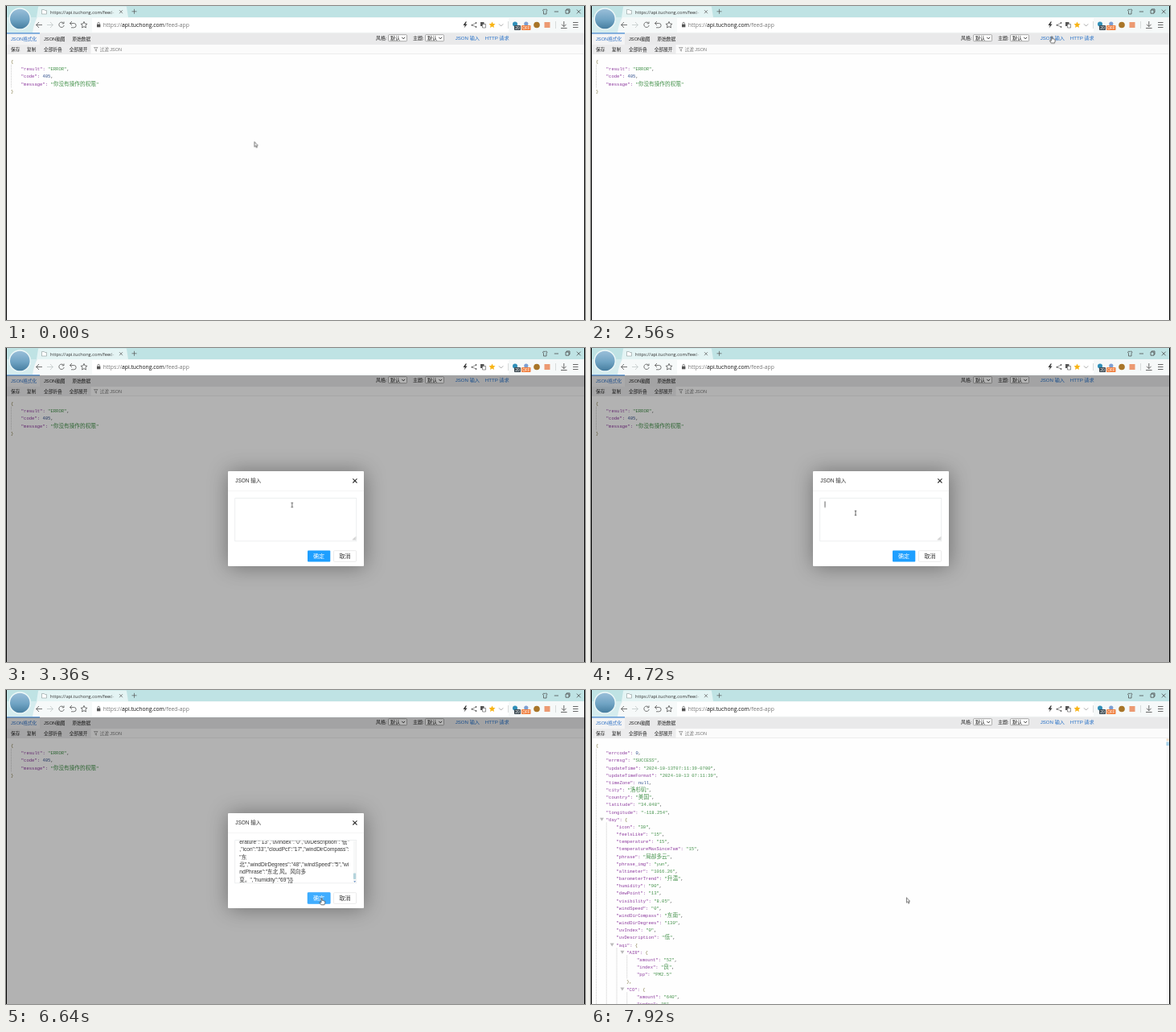
Animation of 720 by 390 pixels, one loop 8000 ms. Source, as an HTML page:

```html
<!DOCTYPE html>
<html lang="zh-CN">
<head>
<meta charset="utf-8">
<title>JSON</title>
<style>
html, body { margin: 0; width: 100%; height: 100%; overflow: hidden; background: #fefefe; }
svg, div { position: absolute; }
svg { left: 0; top: 0; overflow: hidden; }
text { white-space: pre; font-family: "Liberation Sans", "Noto Sans CJK SC", "Noto Sans CJK JP", sans-serif; }
.ui { font-family: "Open Sans", "Noto Sans", sans-serif; }
.code { font: 5.56px "Liberation Mono", "Noto Sans CJK SC", "Noto Sans CJK JP", monospace; }
.cjk { font-size: 6.67px; }
#shade { left: 1px; top: 34px; width: 718px; height: 356px; background: rgba(0, 0, 0, .3); }
#dialog { left: 275.5px; top: 152.5px; width: 169px; height: 118px; background: #fff; border-radius: 1px; box-shadow: 1px 1px 26px rgba(0, 0, 0, .38); }
</style>
</head>
<body>
<svg id="page" width="720" height="390"></svg>
<div id="shade"></div>
<div id="dialog"><svg id="form" width="169" height="118" viewBox="275.5 152.5 169 118"></svg></div>
<svg id="top" width="720" height="390"></svg>
<script>
const LOOP = 8000;
const CLICK_LINK = 2680, CLICK_FIELD = 4600, PASTE = 5440, CONFIRM = 7040;
const $ = id => document.getElementById(id);

function add(parent, tag, attrs = {}, content = '') {
  const el = document.createElementNS('http://www.w3.org/2000/svg', tag);
  for (const key in attrs) el.setAttribute(key, attrs[key]);
  el.textContent = content;
  return parent.appendChild(el);
}
const rect = (p, x, y, width, height, fill, more) => add(p, 'rect', { x, y, width, height, fill, ...more });
const line = (p, d, stroke = '#555', width = .8, fill = 'none') =>
  add(p, 'path', { d, stroke, 'stroke-width': width, fill });
const shape = (p, d, fill) => add(p, 'path', { d, fill });
const text = (p, x, y, size, fill, str, more) => add(p, 'text', { x, y, 'font-size': size, fill, ...more }, str);

// steps: [time, properties]
function animate(el, steps, easing = 'linear') {
  const frames = steps.map(([t, props]) => ({ ...props, offset: t / LOOP, easing }));
  el.animate(frames, { duration: LOOP, iterations: Infinity });
}
// Shown only inside the given [from, to] spans.
function show(el, ...spans) {
  const steps = [[0, { opacity: 0 }]];
  for (const [from, to] of spans) steps.push([from, { opacity: 1 }], [to, { opacity: 0 }]);
  steps.push([LOOP, { opacity: 0 }]);
  animate(el, steps, 'step-end');
}

function drawBrowser(p) {
  rect(p, 0, 0, 720, 14, '#bfe3e4');
  rect(p, 0, 14, 720, 20, '#f6f9f9');
  rect(p, 107, 15, 518, 17.5, '#fff');
  shape(p, 'M38 14L40 1.5Q40 .5 41 .5H149Q150 .5 150 1.5L152 14Z', '#e4f4f4');
  shape(p, 'M0 14H39Q35 20 33 33H0Z', '#d5ecee');

  const sky = add(add(p, 'defs'), 'linearGradient', { id: 'sky', x2: 0, y2: 1 });
  add(sky, 'stop', { offset: 0, 'stop-color': '#9cc0da' });
  add(sky, 'stop', { offset: .55, 'stop-color': '#6fa3c3' });
  add(sky, 'stop', { offset: 1, 'stop-color': '#447b9d' });
  add(p, 'circle', { cx: 17.3, cy: 16, r: 13, fill: 'url(#sky)', stroke: '#eef8f8', 'stroke-width': 1.4 });

  line(p, 'M44.5 4.5H47.5L48.3 5.5H50.5V10H44.5Z', '#8a9898', .6, '#fff');
  text(p, 55, 9.6, 5.7, '#333', 'https://api.tuchong.com/feed-', { class: 'ui' });
  rect(p, 130, 3, 6, 9, '#e4f4f4', { opacity: .5 });
  line(p, 'M141 5.2L145 9.2M145 5.2L141 9.2', '#555', .7);
  line(p, 'M156.5 6.8H162.5M159.5 3.8V9.8', '#555', .7);

  line(p, 'M667.5 5L669 4Q670.3 5.4 671.6 4L673 5L672 6.8V10H668.5V6.8Z', '#444', .7);
  line(p, 'M681.8 7H687M696 5H700V9.2H696ZM697.2 5V3.9H701V8H700M709.8 4.6L714.6 9.4M714.6 4.6L709.8 9.4', '#444', .75);

  line(p, 'M45 23.5H37.7M41 20L37.6 23.5L41 27');
  line(p, 'M51 23.5H58.3M55 20L58.4 23.5L55 27', '#c2c8c8');
  line(p, 'M71.5 21.2A3.2 3.2 0 1 0 72.2 24M72 19.5V21.8H69.7');
  line(p, 'M79.5 21.5H84.5A2.6 2.6 0 0 1 84.5 26.8H81M82 19L79.4 21.5L82 24');
  const star = x => `M${x} 19.4l1.2 2.6 2.8.3-2.1 1.9.6 2.8-2.5-1.4-2.5 1.4.6-2.8-2.1-1.9 2.8-.3Z`;
  line(p, star(97));
  rect(p, 113, 22.7, 4.4, 3.6, '#555');
  line(p, 'M114 22.8V21.5A1.2 1.2 0 0 1 116.4 21.5V22.8', '#555', .7);

  const url = add(p, 'text', { x: 120.8, y: 25.8, 'font-size': 6.8, class: 'ui' });
  add(url, 'tspan', { fill: '#777' }, 'https://');
  add(url, 'tspan', { fill: '#111' }, 'api.tuchong.com');
  add(url, 'tspan', { fill: '#777' }, '/feed-app');

  shape(p, 'M571.5 19.5L568.5 24H570.8L569.6 27.5L573.5 22.6H571.2L573 19.5Z', '#333');
  line(p, 'M584.5 21L579.5 23.7L584.5 26', '#666', .7);
  [[584.5, 21], [579.5, 23.7], [584.5, 26]].forEach(([cx, cy]) => add(p, 'circle', { cx, cy, r: 1, fill: '#666' }));
  rect(p, 590, 20, 4.5, 5, '#555');
  line(p, 'M593 22.5H596.5V27H592.5V25', '#666', .7, '#fff');
  shape(p, star(604.5), '#f8b416');
  line(p, 'M613 22.3L615.6 25L618.2 22.3', '#888', .7);
  line(p, 'M624.5 19V28M683.5 19V28', '#d0d4d4', .8);

  add(p, 'circle', { cx: 633, cy: 22.6, r: 3, fill: '#2f8fb8' });
  rect(p, 632, 24, 8, 6, '#3d4a52', { rx: .8 });
  text(p, 633.3, 28.9, 5, '#fff', '20');
  add(p, 'circle', { cx: 646.8, cy: 22, r: 2.6, fill: '#7d9fd2' });
  rect(p, 641, 24, 11.5, 6, '#f08040', { rx: .8 });
  text(p, 641.9, 28.9, 4.8, '#fff', 'OFF');
  add(p, 'circle', { cx: 660, cy: 23.5, r: 3.8, fill: '#a87528' });
  rect(p, 669.5, 20, 7, 7, '#ec9a72');
  line(p, 'M693.8 19V25.5M691 22.8L693.8 25.6L696.6 22.8M690 27.5H697.6M705 20.5H711.5M705 23.5H711.5M705 26.5H711.5', '#444', .8);
}

function drawToolbar(p) {
  rect(p, 0, 33.5, 720, 14.5, '#e9e9ea');
  rect(p, 1, 34, 41, 14, '#f3f3f4');
  rect(p, 1, 33.3, 41, 1.2, '#3d83d0');
  rect(p, 0, 48, 720, 11.5, '#fbfbfb');
  rect(p, 0, 48, 105.5, 11.5, '#ececed');
  rect(p, 0, 59, 720, .6, '#e4e4e5');
  const labels = [
    [6, 43, 5.7, '#2c6fc4', 'JSON格式化'], [47, 43, 5.7, '#222', 'JSON脑图'], [82.5, 43, 5.7, '#222', '原始数据'],
    [6, 55.6, 5.7, '#222', '保存'], [26, 55.6, 5.7, '#222', '复制'],
    [47, 55.6, 5.7, '#222', '全部折叠'], [78.7, 55.6, 5.7, '#222', '全部展开'],
    [116.7, 55.7, 5.5, '#777', '过滤 JSON'],
    [460, 42, 6, '#222', '风格:'], [506, 42, 6, '#222', '主题:'],
    [558.7, 42.1, 6.1, '#2470c8', 'JSON 输入'], [595.8, 42.1, 6.1, '#2470c8', 'HTTP 请求']
  ];
  labels.forEach(label => text(p, ...label));
  line(p, 'M109.5 51.5H114L112.4 53.6V56.2L111.2 55.4V53.6Z', '#777', .6);
  for (const x of [475.5, 521.5]) {
    rect(p, x, 35.7, 23, 8, '#fff', { rx: 1, stroke: '#777', 'stroke-width': .6 });
    text(p, x + 2.5, 42, 6, '#111', '默认');
    line(p, `M${x + 16.8} 38.8l1.9 2 1.9-2`, '#222', .9);
  }
}

const ROW = 9.17, INDENT = 12.75;
const rowY = i => 71 + i * ROW;

function drawJson(p, data) {
  const rows = JSON.stringify(data, null, 4).split('\n');
  const open = [];
  const guide = (level, from, to) => add(p, 'path', {
    d: `M${6.5 + level * INDENT} ${rowY(from) + 2}V${rowY(to) - 6}`,
    stroke: '#b5b5b5', 'stroke-width': .7, 'stroke-dasharray': '1 1'
  });
  rows.forEach((row, i) => {
    const body = row.trimStart(), level = (row.length - body.length) / 4;
    if (body.endsWith('{')) open.push(i);
    if (body.startsWith('}')) guide(level, open.pop(), i);
    if (rowY(i) > 400) return;
    const x = 6 + level * INDENT;
    if (level && body.endsWith('{')) shape(p, `M${x - 7.8} ${rowY(i) - 4}h5l-2.5 4Z`, '#b9b9b9');
    const el = add(p, 'text', { x, y: rowY(i), class: 'code' });
    for (const [token] of body.matchAll(/"[^"]*":?|[\d]+|null|[^"\dn]+/g)) {
      const fill = token.endsWith('":') ? '#8d3a9e'
        : token[0] === '"' ? '#43914a'
        : /\w/.test(token) ? '#34528f'
        : /[{}]/.test(token) ? '#7d7440' : '#555';
      for (const part of token.match(/[\x00-\xff]+|[^\x00-\xff]+/g))
        add(el, 'tspan', { fill, class: part > '\xff' ? 'cjk' : '' }, part);
    }
  });
}

const denied = { result: 'ERROR', code: 405, message: '你没有操作的权限' };
const weather = {
  errcode: 0, errmsg: 'SUCCESS',
  updateTime: '2024-10-13T07:11:39-0700', updateTimeFormat: '2024-10-13 07:11:39',
  timeZone: null, city: '洛杉矶', country: '美国', latitude: '34.048', longitude: '-118.254',
  day: {
    icon: '30', feelsLike: '15', temperature: '15', temperatureMaxSince7am: '15',
    phrase: '局部多云', phrase_img: 'yun', altimeter: '1016.26', barometerTrend: '升温',
    humidity: '90', dewPoint: '13', visibility: '8.05', windSpeed: '0',
    windDirCompass: '东南', windDirDegrees: '130', uvIndex: '0', uvDescription: '低',
    aqi: {
      AIR: { amount: '52', index: '良', pp: 'PM2.5' },
      CO: { amount: '640', index: '6', pp: 'CO' }
    }
  }
};

function drawDialog(p) {
  text(p, 284.7, 166.4, 6.5, '#333', 'JSON 输入');
  line(p, 'M430.8 161.8L436 167M436 161.8L430.8 167', '#333', 1.1);
  rect(p, 275.5, 176.7, 169, .6, '#eee');
  rect(p, 284.3, 186.2, 151, 53.2, '#fff', { stroke: '#e2e4e6', 'stroke-width': .6 });
  const clip = add(add(p, 'defs'), 'clipPath', { id: 'field' });
  rect(clip, 284, 186.5, 152, 52.6);

  const caret = rect(p, 290.2, 190, .7, 7.6, '#222');
  show(caret, [CLICK_FIELD, 5120]);

  const pasted = add(p, 'g', { 'clip-path': 'url(#field)' });
  ['erature":"13","uvIndex":"0","uvDescription":"低"',
    ',"icon":"33","cloudPct":"17","windDirCompass":',
    '"东',
    '北","windDirDegrees":"48","windSpeed":"5","wi',
    'ndPhrase":"东北 风。风向多',
    '变。","humidity":"69"}]}'
  ].forEach((str, i) => text(pasted, 289.8, 190.4 + i * 9.33, 6.6, '#333', str));
  rect(pasted, 431.2, 187, 3.8, 52, '#f7f8f8');
  rect(pasted, 431.4, 227, 3.4, 7.6, '#b5d4dc', { rx: 1 });
  shape(pasted, 'M431.8 236.8h2.8l-1.4 1.6Z', '#5b86c0');
  show(pasted, [PASTE, LOOP]);

  const grip = line(p, 'M430.8 238L434.4 234.4M433 238L434.4 236.6', '#555', .6);
  animate(grip, [[0, { opacity: 1 }], [PASTE, { opacity: 0 }], [LOOP, { opacity: 0 }]], 'step-end');

  rect(p, 374.5, 251, 28.3, 14, '#1e9fff', { rx: 1 });
  const hover = rect(p, 374.5, 251, 28.3, 14, '#3fadff', { rx: 1 });
  show(hover, [6140, LOOP]);
  text(p, 381.5, 260.4, 7, '#fff', '确定');
  rect(p, 407, 251.2, 28, 13.6, '#fff', { rx: 1, stroke: '#dedede', 'stroke-width': .6 });
  text(p, 414, 260.4, 7, '#333', '取消');
}

function drawPointer(p) {
  const pointer = add(p, 'g');
  const arrow = add(pointer, 'g'), hand = add(pointer, 'g'), beam = add(pointer, 'g');
  line(arrow, 'M.4 .4V6.6L1.8 5.4L2.8 7.6L3.8 7.1L2.8 5H4.6Z', '#333', .65, '#fff');
  line(hand, 'M-.7 6V.9Q0 -.3 .7 .9V3.6Q1.5 3 2 3.9Q2.8 3.3 3.2 4.2Q4.2 3.8 4.2 5V6.5L3.3 8.8H-.6L-2.6 5.8Q-2.3 4.6 -.7 6Z', '#222', .65, '#fff');
  line(beam, 'M-1.2 -2.8H-.3L0 -2.4L.3 -2.8H1.2M0 -2.6V2.6M-1.2 2.8H-.3L0 2.4L.3 2.8H1.2', '#222', .7);
  show(arrow, [0, 2150], [CLICK_LINK, 3200], [5950, 6140], [CONFIRM + 80, LOOP]);
  show(hand, [2150, CLICK_LINK], [6140, CONFIRM + 80]);
  show(beam, [3200, 5950]);

  const path = [
    [0, 308.5, 168.3], [320, 308.5, 168.3], [1200, 400, 164], [1360, 448.5, 140],
    [2080, 545, 91], [2160, 573, 37.3], [2720, 573, 37.3], [3280, 355.7, 195],
    [3520, 355.7, 195], [4400, 329, 205], [PASTE, 329, 205],
    [6240, 392.5, 258], [CONFIRM, 392.5, 258], [7200, 392, 257.5], [LOOP, 392, 257.5]
  ];
  animate(pointer, path.map(([t, x, y]) => [t, { transform: `translate(${x}px, ${y}px)` }]));
}

const before = add($('page'), 'g'), after = add($('page'), 'g');
drawJson(before, denied);
drawJson(after, weather);
rect(after, 715.3, 60, 3.5, 330, '#f8f8f8');
rect(after, 715.6, 60.5, 3, 2.6, '#f4dcc4');
rect(after, 715.4, 64.5, 3.4, 4.6, '#a9d4ec');
drawBrowser($('page'));
drawToolbar($('page'));
drawDialog($('form'));
drawPointer($('top'));
rect($('top'), 0, 0, 1, 390, '#000');
rect($('top'), 719, 0, 1, 390, '#000');

show(before, [0, CONFIRM + 80]);
show(after, [CONFIRM + 80, LOOP]);
show($('shade'), [CLICK_LINK, CONFIRM]);

const small = { opacity: 0, transform: 'scale(.5)' }, full = { opacity: 1, transform: 'scale(1)' };
animate($('dialog'), [
  [0, small], [CLICK_LINK, small], [CLICK_LINK + 300, full],
  [CONFIRM, full], [CONFIRM + 200, { opacity: 0, transform: 'scale(.7)' }], [LOOP, small]
]);
</script>
</body>
</html>
```
